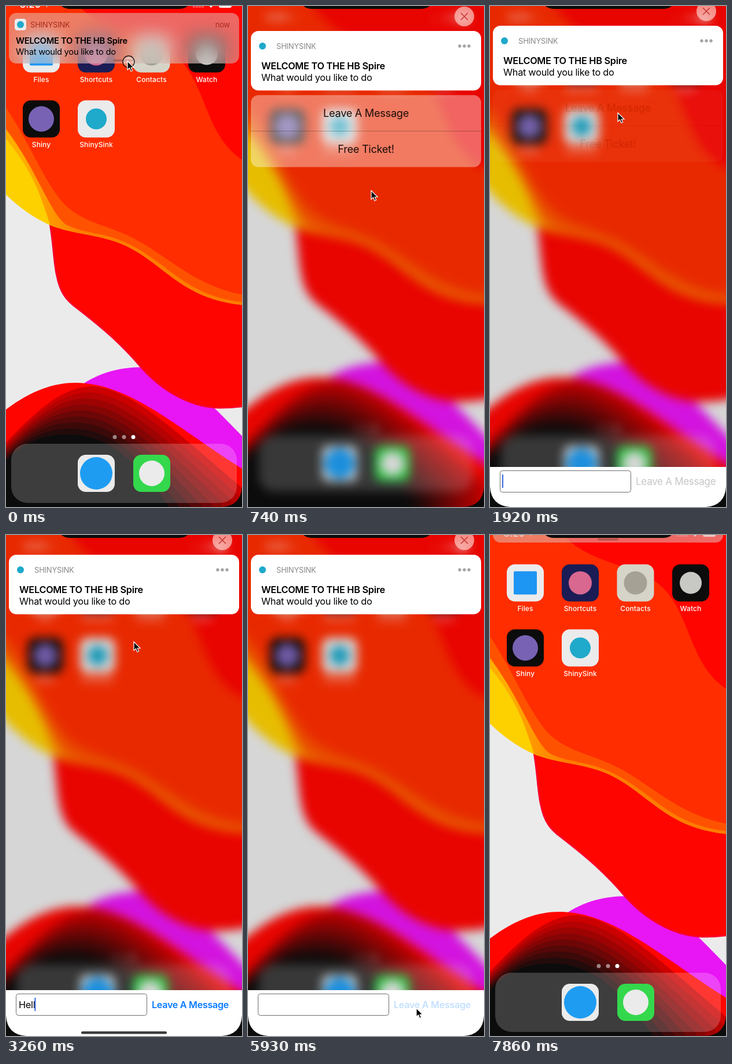
These frames come from a looping animation (408 by 863 pixels, 8 s). An HTML page:

```html
<!DOCTYPE html>
<html lang="en">
<head>
<meta charset="utf-8">
<title>Notification demo</title>
<style>
html, body { margin: 0; width: 100%; height: 100%; overflow: hidden; background: #0c0c0c; }
#stage { position: relative; width: 408px; height: 863px; overflow: hidden; }
#stage > * { position: absolute; left: 0; top: 0; }
svg { display: block; overflow: visible; }
text { font-family: Inter, "Liberation Sans", sans-serif; letter-spacing: -.0165em; white-space: pre; }
#home { width: 408px; height: 863px; transform-origin: 204px 460px; }
#home text { font-size: 12px; font-weight: 500; letter-spacing: .1px; fill: #fff; text-anchor: middle; }
#stage > #banner { left: 5px; top: 12px; width: 398px; height: 87px; border-radius: 13px;
  background: rgba(220, 212, 208, .48); backdrop-filter: blur(15px); }
.app { font-size: 13px; }
.bold { font-weight: 600; }
#look .bold, #look .body { font-size: 16.3px; }
#banner .bold, #banner .body { font-size: 14.7px; }
.action { font-size: 18.2px; text-anchor: middle; fill: #1c0d08; }
</style>
</head>
<body>
<div id="stage">
  <div id="home">
    <svg width="408" height="863">
      <defs>
        <linearGradient id="amber" gradientUnits="userSpaceOnUse" x1="30" x2="130">
          <stop offset="0" stop-color="#ffae00"/>
          <stop offset="1" stop-color="#ff7c00"/>
        </linearGradient>
      </defs>
      <path fill="#ebebeb" d="M-60-60H468V923H-60Z"/>
      <path fill="#e815f5" d="M120 660C155 634 190 622 240 622L355 688C375 705 410 745 468 800V900H120Z"/>
      <path fill="#ff0500" stroke="#fa0028" stroke-width="3" d="M74 365C82 400 82 440 88 465C94 495 105 508 125 522C165 553 200 582 235 624C275 668 325 692 370 692Q420 692 468 676V300Z"/>
      <path fill="#fdd000" d="M-60-60H468V512Q430 517 400 514C300 500 275 445 205 412C160 392 120 395 75 377Q35 359 0 325Q-30 295-60 250Z"/>
      <path fill="url(#amber)" d="M-60-60H468V512Q430 517 400 514C300 500 275 445 205 412C160 392 120 395 76 377Q68 350 55 317Q35 270 0 229L-60 160Z"/>
      <path fill="#ff5200" d="M-60-60H468V507Q430 512 400 509C305 495 280 441 208 408C165 388 135 393 103 376C75 355 55 285 0 212L-60 140Z"/>
      <path fill="#ff2d00" d="M-60-60H468V500L408 497C320 480 275 425 210 395C165 375 125 370 95 335C60 290 40 235 0 175L-60 110Z"/>
      <path fill="#ff0500" d="M90-60Q105-20 131 5C175 45 230 50 275 73C350 115 335 215 408 265L468 290V-60Z"/>
      <path fill="#ff0500" d="M-60 740Q-30 718 0 695C45 661 85 649 120 649C215 649 300 730 408 797L468 840V923H-60Z"/>
      <g id="cave"></g>
      <g fill="#fff">
        <circle cx="188" cy="742.500" r="3.500" opacity=".5"/>
        <circle cx="204" cy="742.500" r="3.500" opacity=".5"/>
        <circle cx="220" cy="742.500" r="3.500"/>
        <rect x="9" y="754" width="390" height="102" rx="28" opacity=".2"/>
        <rect x="368" y="-8" width="22" height="11" rx="3"/>
        <path d="M349-3Q354.500-7 360-3L354.500 3Z"/>
        <path d="M323 0h4v3h-4zm5 0h4v3h-4zm5 0h4v3h-4zm5 0h4v3h-4z" opacity=".3"/>
      </g>
      <text x="42" y="3" style="font-size:16px;font-weight:600">8:20</text>
      <path fill="#fff" d="M66-2L75-7L70 3V-2Z"/>
      <g id="icons"></g>
    </svg>
  </div>

  <div id="banner">
    <svg width="398" height="87" viewBox="5 12 398 87">
      <rect x="15" y="22" width="20" height="20" rx="4.500" fill="#ebebeb"/>
      <circle cx="25" cy="32" r="6" fill="#1fa9cb"/>
      <text class="app" x="42" y="37" fill="#a82c1c">SHINYSINK</text>
      <text class="app" x="387" y="37" fill="#a82c1c" text-anchor="end">now</text>
      <text class="bold" x="17" y="65">WELCOME TO THE HB Spire</text>
      <text class="body" x="17" y="84">What would you like to do</text>
      <rect x="186" y="92" width="36" height="3.500" rx="1.700" fill="#7a3a34" opacity=".45"/>
    </svg>
  </div>

  <svg width="408" height="863">
    <g id="look">
      <g id="close">
        <circle cx="374" cy="9" r="17" fill="#ffd2cc" opacity=".66"/>
        <path d="M368.500 3.500l11 11m0-11l-11 11" stroke="#c43a34" stroke-width="1.700" stroke-linecap="round"/>
      </g>
      <g id="actions">
        <rect x="5" y="144.500" width="398" height="124" rx="13" fill="#fff" opacity=".38"/>
        <path id="press" fill="#fff" opacity=".35" d="M5 206.500V157.500a13 13 0 0 1 13-13H390a13 13 0 0 1 13 13V206.500Z"/>
        <path d="M5 206.500H403" stroke="#000" opacity=".25"/>
        <text class="action" x="204" y="182">Leave A Message</text>
        <text class="action" x="204" y="244">Free Ticket!</text>
      </g>
      <g id="card">
        <rect x="5" y="34" width="398" height="102.500" rx="13" fill="#fff"/>
        <circle cx="25" cy="60" r="6" fill="#1fa9cb"/>
        <text class="app" x="49" y="65" fill="#88888c">SHINYSINK</text>
        <g fill="#a4a4a8">
          <circle cx="366" cy="60" r="2.700"/><circle cx="374" cy="60" r="2.700"/><circle cx="382" cy="60" r="2.700"/>
        </g>
        <text class="bold" x="23" y="100">WELCOME TO THE HB Spire</text>
        <text class="body" x="23" y="120">What would you like to do</text>
      </g>
    </g>

    <g id="bar">
      <rect width="408" height="100" fill="#fff"/>
      <rect x="17.500" y="6.500" width="226" height="37" rx="4" fill="#fff" stroke="#6e6e70"/>
      <text id="typed" x="22" y="30.500" font-size="16.300"></text>
      <rect id="caret" y="13" width="2" height="23" fill="#3a6ae0"/>
      <text id="send" x="252" y="31">Leave A Message</text>
      <rect id="grip" x="130" y="71" width="148" height="4.500" rx="2.200" fill="#3c3c3e"/>
    </g>

    <path d="M0 828Q2 861 35 863H0ZM408 828Q406 861 373 863H408Z" fill="#0c0c0c"/>
    <path d="M95-1Q100 5 112 5H298Q310 5 315-1Z" fill="#0c0c0c"/>
    <g id="cursor">
      <circle id="ring" cx="2" cy="1" r="10" fill="#fff" fill-opacity=".4" stroke="#111" stroke-width="1.300"/>
      <path d="M0 0V15L3.500 11.800L6 17.500L8.600 16.300L6.200 11H11Z" stroke="#fff" stroke-width="1.200"/>
    </g>
  </svg>
</div>

<script>
const LOOP = 8000, STEPS = 54, BANDS = 9;
const $ = id => document.getElementById(id);
const show = (id, on) => $(id).style.opacity = +on;

// Nested hills, from a wide dark red one to a narrow black one.
const wide = [-60, 810, 0, 752, 50, 700, 95, 656, 150, 655, 220, 660, 295, 735, 420, 840];
const core = [-60, 832, 0, 783, 40, 745, 70, 738, 110, 738, 185, 740, 230, 790, 295, 880];
for (let i = 0; i < BANDS; i++) {
  const u = i / (BANDS - 1);
  const [x, y, ...rest] = wide.map((a, j) => a + (core[j] - a) * u);
  const dark = 12 * u;
  $('cave').innerHTML += `<path fill="rgb(${dark + 205 * (1 - u)} ${dark} ${dark})"
    d="M${x} ${y}L${rest.slice(0, 2)}C${rest.slice(2)}V923H-60Z"/>`;
}

// x, y, tile colour, mark colour, mark radius, label, square mark
const apps = [
  [61, 82.5, '#ebebeb', '#1d95f3', 20, 'Files', true],
  [156, 82.5, '#1b1c55', '#d8688f', 20, 'Shortcuts'],
  [251.5, 82.5, '#d6d4c8', '#a5a295', 20, 'Contacts'],
  [347, 82.5, '#0c0c0c', '#c8c8c4', 19, 'Watch'],
  [61, 194.5, '#0c0c0c', '#7862b4', 22, 'Shiny'],
  [156, 194.5, '#ebebeb', '#1fa9cb', 18, 'ShinySink'],
  [156, 805, '#ebebeb', '#1e9cf2', 28, ''],
  [252, 805, '#34d84c', '#ebebeb', 22, '']
];
$('icons').innerHTML = apps.map(([x, y, tile, mark, r, label, square]) =>
  `<rect x="${x - 32}" y="${y - 32}" width="64" height="64" rx="14" fill="${tile}"/>
   <rect x="${x - r}" y="${y - r}" width="${2 * r}" height="${2 * r}" rx="${square ? 2 : r}" fill="${mark}"/>
   <text x="${x}" y="${y + 48}">${label}</text>`).join('');

// Piecewise linear track: step, value, step, value, ...
function track(k, ...p) {
  if (k <= p[0]) return p[1];
  for (let i = 2; i < p.length; i += 2)
    if (k <= p[i]) return p[i - 1] + (p[i + 1] - p[i - 1]) * (k - p[i - 2]) / (p[i] - p[i - 2]);
  return p[p.length - 1];
}
const smooth = u => u * u * (3 - 2 * u);

function draw(k) {
  const blur = track(k, 0, 0, 3, .9, 4, 1, 40, 1, 41, .7, 42, .3, 43, 0);
  $('home').style.transform = `scale(${1 - .049 * blur})`;
  $('home').style.filter = blur ? `blur(${9 * blur}px) brightness(${1 - .09 * blur})` : 'none';

  const peek = k >= 53;
  $('banner').style.transform = `translateY(${peek ? -86 : track(k, 0, 0, 4, 34)}px)`;
  $('banner').style.display = k < 4 || peek ? 'block' : 'none';
  show('banner', peek ? 1 : track(k, 2, 1, 4, 0));

  const drop = track(k, 2, -6, 4, 12, 5, 9, 6, 4, 7, 1, 8, 0, 40, 0, 41, 130, 42, 480, 43, 864, 44, 920);
  const size = track(k, 40, 1, 43, .9);
  $('look').setAttribute('transform', `translate(${204 * (1 - size)} ${drop}) scale(${size})`);
  show('card', track(k, 2, 0, 4, 1));
  show('close', track(k, 2, 0, 5, 1));
  show('actions', track(k, 2, 0, 5, 1, 11, 1, 12, .5, 13, .1, 14, 0));
  $('press').style.display = k === 9 ? '' : 'none';

  const top = track(k, 11, 863, 12, 835, 13, 794, 14, 786, 15, 784, 40, 784, 41, 830, 42, 870);
  $('bar').setAttribute('transform', `translate(0 ${top})`);
  const letters = k >= 40 ? 0 : k >= 25 ? 6 : k >= 24 ? 5 : Math.max(0, Math.min(4, k - 18));
  $('typed').textContent = 'Hello!'.slice(0, letters);
  $('caret').setAttribute('x', 21 + (letters && $('typed').getComputedTextLength()));
  show('caret', k >= 12 && k < 29);
  const active = k >= 19;
  $('send').setAttribute('font-size', active ? 16.1 : 17);
  $('send').setAttribute('font-weight', active ? 600 : 400);
  $('send').setAttribute('fill', k >= 40 ? '#c4e0ff' : active ? '#087aff' : '#c6c6c8');
  show('grip', track(k, 14, 0, 17, 1, 34, 1, 37, 0));

  const go = smooth(track(k, 32, 0, 39, 1));
  const x = track(k, 0, 210, 5, 213, 8, 221) + 70 * go;
  const y = track(k, 0, 95, 1, 125, 4, 300, 5, 318, 6, 285, 7, 215, 8, 184) + 631 * go;
  $('cursor').setAttribute('transform', `translate(${x} ${y})`);
  show('cursor', k < 42);
  show('ring', k < 5);
}

// Motion advances in even steps; a small lead keeps each step on time.
function frame() {
  const t = performance.now() % LOOP;
  draw(Math.min(STEPS - 1, Math.floor((t + 12) * STEPS / LOOP)));
  requestAnimationFrame(frame);
}
frame();
</script>
</body>
</html>
```
